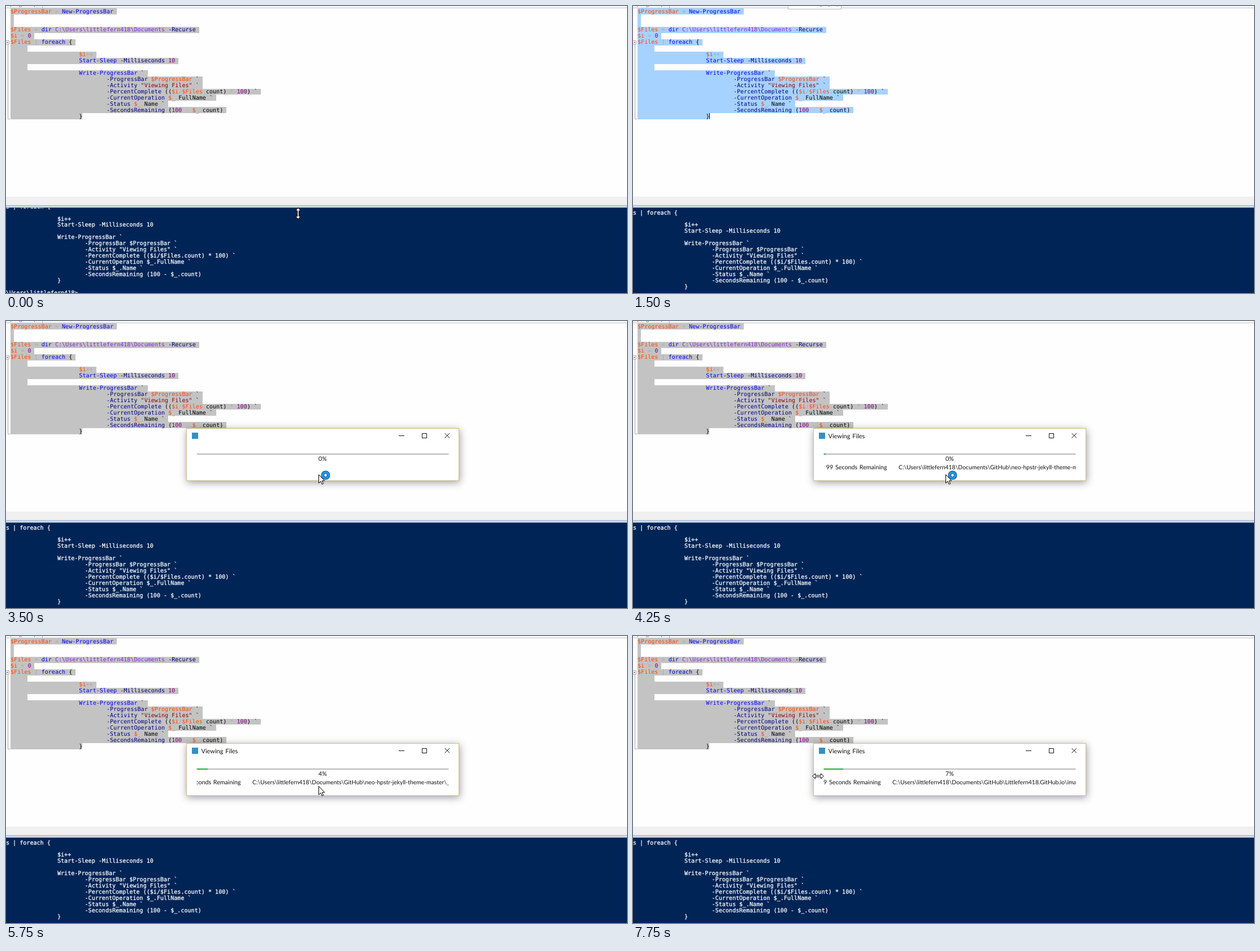
An HTML page that plays this animation: 1099 by 509 pixels, repeating every 8 s.

```html
<!DOCTYPE html>
<html lang="en">
<head>
<meta charset="utf-8">
<title>Progress bar script</title>
<style>
  html, body { margin: 0; width: 100%; height: 100%; overflow: hidden; background: #fefefe; }
  svg { display: block; }
  text { white-space: pre; text-rendering: geometricPrecision; }
  .mono { font: 10.08px "DejaVu Sans Mono", monospace; }
  .ui { font: 10.7px Lato, "Open Sans", sans-serif; word-spacing: 1px; fill: #111; }
  #title { font-size: 11px; }
  #path { font-size: 10.4px; }
  #console { fill: #fff; stroke: #fff; stroke-width: .25px; }
  #window { filter: drop-shadow(1px 3px 7px rgba(0, 0, 0, .38)); }
</style>
</head>
<body>
<svg id="stage" width="1099" height="509" viewBox="0 0 1099 509">
  <defs>
    <clipPath id="detailClip"><rect x="337.5" y="250" width="446" height="20"/></clipPath>
    <clipPath id="consoleClip"><rect y="358" width="1099" height="151"/></clipPath>
    <path id="double" d="M0-10 4.5-5H1.3V5H4.5L0 10-4.5 5H-1.3V-5H-4.5Z" fill="#fff" stroke="#000"/>
  </defs>

  <rect width="1099" height="509" fill="#fefefe"/>
  <g id="selection"></g>
  <g id="code" class="mono"></g>
  <path id="caret" d="M135.5 190V200.500" stroke="#000"/>

  <!-- folding margin -->
  <g fill="none" stroke="#a8a8a8">
    <path d="M3.500 68V200.500H7"/>
    <path d="M-.5 61.500H5.500V67.500H-.5" fill="#fff"/>
    <path d="M1 64.500H4" stroke="#444"/>
  </g>

  <!-- tab strip -->
  <rect width="1099" height="3" fill="#f7f7f7"/>
  <path d="M0 3.500H1099" stroke="#c9c9c9"/>
  <path d="M64.500 0V4" stroke="#aaa"/>
  <text class="ui" x="7" y="0" style="fill:#777">progress.ps1</text>
  <g id="tip">
    <rect x="274.500" y="-10" width="94" height="15.500" fill="#fff" stroke="#b5b5b5"/>
    <text class="ui" x="363" y="0" text-anchor="end" style="fill:#666">Run Script (F5)</text>
  </g>

  <!-- splitter and console -->
  <rect y="338" width="1099" height="16" fill="#f0f0f0"/>
  <rect y="353" width="1099" height="2" fill="#b4c6dc"/>
  <rect y="355" width="1099" height="2" fill="#cfdded"/>
  <rect y="357" width="1099" height="1" fill="#6f8db3"/>
  <rect y="358" width="1099" height="151" fill="#012456"/>
  <g clip-path="url(#consoleClip)"><g id="console" class="mono"></g></g>

  <g id="dialog">
    <rect id="window" x="319.500" y="190.500" width="482" height="92.500" fill="#fff" stroke="#cdbb86"/>
    <rect x="329" y="198" width="11" height="11" fill="#3490c4"/>
    <text id="title" class="ui" x="345.500" y="207.500">Viewing Files</text>
    <path d="M695 203.500H705M736.500 199.500H744.500V207.500H736.500ZM776.500 199 785 207.500M785 199 776.500 207.500"
          fill="none" stroke="#111"/>
    <rect x="338" y="235" width="445.500" height="2" fill="#b9b9b9"/>
    <rect id="bar" x="337.500" y="235" width="0" height="2" fill="#22ac3e"/>
    <text id="percent" class="ui" x="560.500" y="248" text-anchor="middle">0%</text>
    <g id="detail" clip-path="url(#detailClip)">
      <text id="remaining" class="ui" y="262.500" text-anchor="end">99 Seconds Remaining</text>
      <text id="path" class="ui" y="262.500"></text>
    </g>
  </g>

  <g id="pointer">
    <g id="arrow">
      <path d="M.5.5V15.500L4 12.200 6.400 17.500 8.700 16.500 6.300 11.300H10.800Z" fill="#fff" stroke="#000"/>
      <g id="busy">
        <circle cx="12.500" cy="1.500" r="5.200" fill="#fff" stroke="#0b4f86" stroke-width="5.600"/>
        <circle cx="12.500" cy="1.500" r="5.200" fill="none" stroke="#2496e8" stroke-width="3.800"/>
      </g>
    </g>
    <use id="sizeV" href="#double"/>
    <use id="sizeH" href="#double" transform="rotate(90)"/>
    <path id="beam" d="M-3-8H-1L0-7 1-8H3M0-7V7M-3 8H-1L0 7 1 8H3" fill="none" stroke="#000"/>
  </g>
</svg>

<script>
const LOOP = 8000, TICK = 250;
const CHAR = 6.068, ROW = 10.94, LEFT = 8, TOP = 4.3;
const USER = 'littlefern418';
const DOCS = `C:\\Users\\${USER}\\Documents`;
const THEME = '\\GitHub\\neo-hpstr-jekyll-theme-master\\';
const SITE = '\\GitHub\\Littlefern418.GitHub.io\\';

const pad = n => ' '.repeat(n);
const script = [
  '$ProgressBar = New-ProgressBar', '', '',
  `$Files = dir ${DOCS} -Recurse`,
  '$i = 0',
  '$Files | foreach {',
  pad(4),
  pad(20) + '$i++',
  pad(20) + 'Start-Sleep -Milliseconds 10',
  pad(4),
  pad(20) + 'Write-ProgressBar `',
  ...['-ProgressBar $ProgressBar `',
    '-Activity "Viewing Files" `',
    '-PercentComplete (($i/$Files.count) * 100) `',
    '-CurrentOperation $_.FullName `',
    '-Status $_.Name `',
    '-SecondsRemaining (100 - $_.count)'].map(s => pad(28) + s),
  pad(20) + '}'
];

// One colour per capture group of the token pattern.
const TOKEN = /(\$\w+)|("[^"]*")|([A-Z]:\\\S+)|([A-Z]\w+-[A-Z]\w+|\bforeach\b|\bdir\b)|(-[A-Z]\w+)|(\d+)|([=|+\/*.-])/g;
const COLOURS = ['#ff4500', '#8b0000', '#8a2be2', '#0000ff', '#000080', '#800080', '#a9a9a9'];

// Time, kind, x, y
const pointerSteps = [
  [0, 'sizeV', 517, 368],
  [500, 'beam', 478, 292],
  [750, 'beam', 390, 160],
  [1000, 'none', 0, 0],
  [1750, 'arrow', 326, 36],
  [2000, 'busy', 346, 140],
  [2250, 'busy', 372, 226],
  [2500, 'busy', 403, 270],
  [2750, 'busy', 502, 270],
  [3500, 'busy', 553, 272],
  [5250, 'arrow', 553, 272],
  [5500, 'arrow', 553, 266],
  [6250, 'arrow', 545, 265],
  [6500, 'arrow', 470, 258],
  [6750, 'arrow', 370, 249],
  [7000, 'arrow', 325, 245],
  [7500, 'sizeH', 327.5, 248.5]
];

// Time, percent, x of the path, path
const progressSteps = [
  [0, 0, 0, ''],
  [4000, 0.3, 520, '\\GitHub\\GitHub.lnk'],
  [4250, 0.8, 470, THEME + '.gitignore'],
  [4500, 1.3, 448, THEME + '_includes'],
  [4750, 1.8, 436, THEME + '_layouts\\post.html'],
  [5000, 2.2, 430, THEME + 'assets\\css\\main.css'],
  [5250, 3, 422, THEME + 'assets\\js\\plugins'],
  [5500, 3.7, 428, THEME + 'images\\bg.png'],
  [5750, 4.4, 436, THEME + '_sass\\page.scss'],
  [6000, 5, 444, THEME + 'index.html'],
  [6250, 5.5, 466, SITE + '_includes'],
  [6500, 6, 470, SITE + '_layouts'],
  [6750, 6.4, 462, SITE + '_posts\\index.md'],
  [7000, 6.8, 477, SITE + 'about'],
  [7250, 7.3, 464, SITE + 'assets\\css'],
  [7500, 7.8, 456, SITE + 'images\\logo.png'],
  [7750, 7.8, 459, SITE + 'images\\bg.png']
];

const $ = id => document.getElementById(id);
const show = (id, on) => $(id).setAttribute('visibility', on ? 'inherit' : 'hidden');
const at = (steps, t) => steps.filter(s => s[0] <= t).pop();

function add(parent, tag, attrs, text = '') {
  const node = document.createElementNS('http://www.w3.org/2000/svg', tag);
  for (const key in attrs) node.setAttribute(key, attrs[key]);
  node.textContent = text;
  return parent.appendChild(node);
}

function addCode(line, row) {
  const text = add($('code'), 'text', { x: LEFT, y: 12.6 + row * ROW });
  let end = 0;
  for (const match of line.matchAll(TOKEN)) {
    add(text, 'tspan', { fill: '#000' }, line.slice(end, match.index));
    add(text, 'tspan', { fill: COLOURS[match.slice(1).findIndex(Boolean)] }, match[0]);
    end = match.index + match[0].length;
  }
  add(text, 'tspan', { fill: '#000' }, line.slice(end));
}

function addSelection(line, row) {
  const y = Math.round(TOP + row * ROW);
  const lineBreak = row < script.length - 1 ? 1 : 0;
  add($('selection'), 'rect', {
    x: LEFT, y, height: Math.round(TOP + (row + 1) * ROW) - y,
    width: Math.round((line.length + lineBreak) * CHAR)
  });
}

function addConsole(line, row) {
  add($('console'), 'text', { x: -30.4, y: 369.6 + (row - 5) * ROW }, line);
}

script.forEach((line, row) => {
  addSelection(line, row);
  addCode(line, row);
  if (row >= 5) addConsole(line, row);
});
addConsole(`PS C:\\Users\\${USER}>`, 19);

function draw(t) {
  const running = t >= 1500, opened = t >= 2250, reporting = t >= 4000;
  const focused = running && !opened;

  $('selection').setAttribute('fill', focused ? '#a6d2ff' : '#c3c3c3');
  $('console').setAttribute('transform', `translate(0 ${running ? 0 : -ROW})`);
  show('caret', focused);
  show('tip', running && t < 1750);

  show('dialog', opened);
  show('title', reporting);
  show('detail', reporting);
  const [, percent, x, file] = at(progressSteps, t);
  $('bar').setAttribute('width', 4.46 * percent);
  $('percent').textContent = Math.floor(percent) + '%';
  $('remaining').setAttribute('x', x - 20.5);
  $('path').setAttribute('x', x);
  $('path').textContent = DOCS + file;

  const [, kind, px, py] = at(pointerSteps, t);
  $('pointer').setAttribute('transform', `translate(${px} ${py})`);
  for (const id of ['sizeV', 'sizeH', 'beam', 'busy']) show(id, id === kind);
  show('arrow', kind === 'arrow' || kind === 'busy');
  // "busy" sits inside "arrow" and inherits its visibility
}

const start = performance.now();
function loop() {
  const t = (performance.now() - start) % LOOP;
  draw(Math.floor(t / TICK) * TICK);
  requestAnimationFrame(loop);
}
loop();
</script>
</body>
</html>
```
